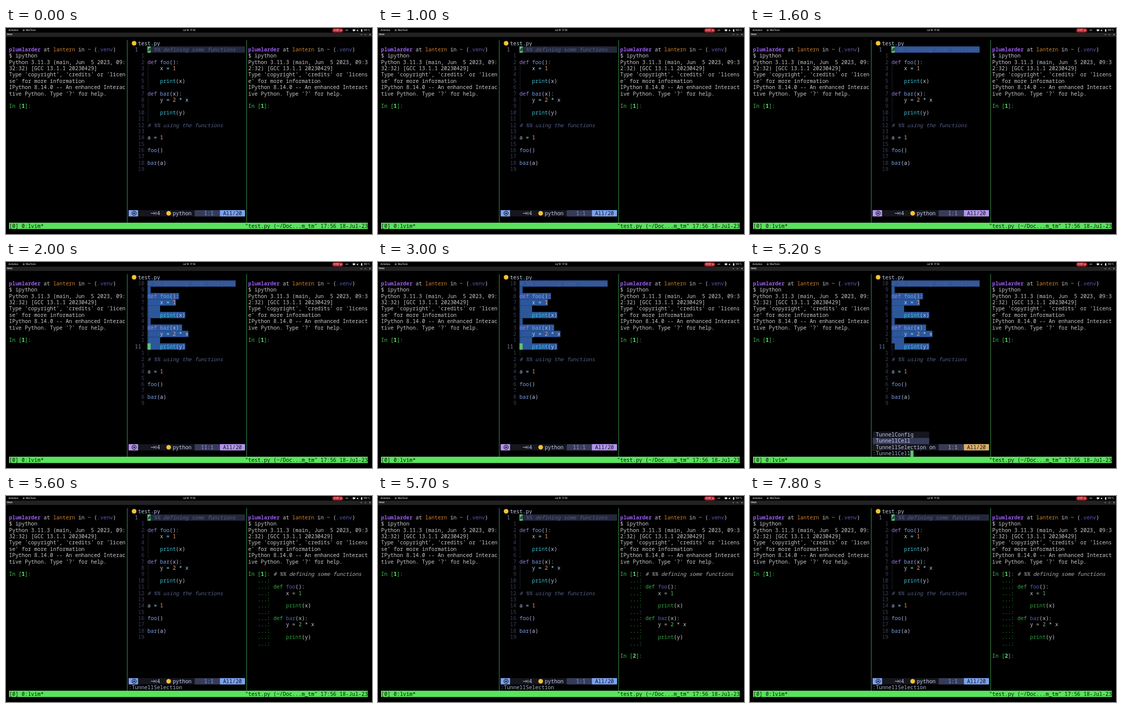
Animation of 720x405 px, one loop 8000 ms. Source, as an HTML page with a canvas:

```html
<!DOCTYPE html>
<html lang="en">
<head>
<meta charset="utf-8">
<title>Terminal session</title>
<style>
html, body { margin: 0; width: 100%; height: 100%; overflow: hidden; background: #000; }
canvas { display: block; width: 100vw; height: 100vh; }
</style>
</head>
<body>
<canvas id="stage" width="720" height="405"></canvas>
<script>
const ctx = document.getElementById('stage').getContext('2d');
const LOOP = 8000, CW = 6.19, RH = 12.38, LEFT = 6, TOP = 23.8;
const MID = 38, CODE = 44, RIGHT = 76;
const MONO = '"Noto Sans Mono", "DejaVu Sans Mono", monospace';
const UI = 'Inter, "Open Sans", sans-serif';

const FG = '#c9c9c9', PALE = '#c4cae8', GREEN = '#40cc50', CURSOR = '#5cc473';
const DARK = '#15161e', INK = '#14151d';
const MODES = { normal: '#7aa2f0', visual: '#b394ee', command: '#dcae68' };
const EDITOR = {
  comment: '#565f89', def: '#9d7ce0', print: '#3fc0d4', name: '#7aa2f0',
  num: '#ff9e64', op: '#89ddff', punct: '#b4bcdc', word: PALE
};
const SHELL = {
  comment: '#b0b0b4', def: '#2fb040', print: '#2fa840', name: '#5a5cb4',
  num: '#66c07a', op: '#b8b8b8', punct: FG, word: FG
};
const SOURCE = [
  '# %% defining some functions', '',
  'def foo():', '    x = 1', '', '    print(x)', '',
  'def bar(x):', '    y = 2 * x', '', '    print(y)', '',
  '# %% using the functions', '', 'a = 1', '', 'foo()', '', 'bar(a)', ''
];
const BANNER = [
  'Python 3.11.3 (main, Jun  5 2023, 09:32:32) [GCC 13.1.1 20230429]',
  "Type 'copyright', 'credits' or 'license' for more information",
  "IPython 8.14.0 -- An enhanced Interactive Python. Type '?' for help."
];
const MENU = ['TunnelConfig', 'TunnellCell', 'TunnellSelection'];
const TOKEN = /(?<comment>#.*)|(?<def>\bdef\b)|(?<print>\bprint\b)|(?<name>\b(?:foo|bar)\b)|(?<num>\d+)|(?<op>[=*])|(?<punct>[():])|(?<word>\w+)/g;

// Each step overrides part of the state from its time on.
const STEPS = [
  [0, { mode: 'normal', line: 1, cmd: null, pick: -1, typing: false, sent: 0 }],
  [1500, { mode: 'visual' }],
  [1700, { line: 11 }],
  [3300, { mode: 'command', typing: true, cmd: ":'<,'>" }],
  [3700, { cmd: ':' }],
  [4000, { cmd: ':T' }],
  [4200, { cmd: ':Tu' }],
  [4300, { cmd: ':Tun' }],
  [4500, { cmd: ':Tunn' }],
  [4600, { cmd: ':' + MENU[0], pick: 0 }],
  [5100, { cmd: ':' + MENU[1], pick: 1 }],
  [5300, { cmd: ':' + MENU[2], pick: 2 }],
  [5600, { mode: 'normal', line: 1, pick: -1, typing: false, sent: 1 }],
  [5700, { sent: 2 }]
];

const colX = c => LEFT + c * CW;
const rowY = r => TOP + r * RH;

function rect(x, y, w, h, color) {
  ctx.fillStyle = color;
  ctx.fillRect(x, y, w, h);
}

function cells(col, row, n, color) {
  rect(colX(col), rowY(row), n * CW, RH, color);
}

function dot(x, y, r, color) {
  ctx.fillStyle = color;
  ctx.beginPath();
  ctx.arc(x, y, r, 0, Math.PI * 2);
  ctx.fill();
}

function stroke(color, width, points) {
  ctx.strokeStyle = color;
  ctx.lineWidth = width;
  ctx.beginPath();
  points.forEach(([x, y], i) => i ? ctx.lineTo(x, y) : ctx.moveTo(x, y));
  ctx.stroke();
}

// Writes on the character grid and returns the next column.
function put(col, row, text, color, style = '500') {
  ctx.font = `${style} 10.32px ${MONO}`;
  ctx.fillStyle = color;
  const y = rowY(row) + RH / 2 + 3.6;
  for (const ch of text) {
    if (ch !== ' ') ctx.fillText(ch, colX(col), y);
    col++;
  }
  return col;
}

function spans(col, row, list) {
  for (const [text, color, style] of list) col = put(col, row, text, color, style);
}

function code(col, row, text, theme) {
  for (const m of text.matchAll(TOKEN)) {
    const kind = Object.keys(m.groups).find(k => m.groups[k] !== undefined);
    put(col + m.index, row, m[0], theme[kind], kind === 'comment' ? 'italic 500' : '500');
  }
}

function label(x, y, text, size, color = '#e4e4e4', weight = 500) {
  ctx.font = `${weight} ${size}px ${UI}`;
  ctx.fillStyle = color;
  ctx.fillText(text, x, y);
}

function desktop(seconds) {
  label(5, 6.2, 'Activities', 4.3);
  rect(33, 2.6, 3.6, 3.6, '#6c6c78');
  label(39, 6.2, 'WezTerm', 4.3);
  label(348, 6.2, 'Jul 18  17:56', 4.3);
  ctx.fillStyle = '#d4202c';
  ctx.beginPath();
  ctx.roundRect(642, 1, 21, 7.4, 3.7);
  ctx.fill();
  label(645, 6.2, '0:0' + seconds, 4.4);
  dot(658.8, 4.7, 1.1, '#f0d0d0');
  label(668, 6.2, 'en', 4.3);

  ctx.fillStyle = '#e4e4e4';
  ctx.beginPath();
  ctx.moveTo(684.5, 7);
  ctx.arc(684.5, 7, 4.4, -Math.PI * 0.76, -Math.PI * 0.24);
  ctx.fill();
  rect(690, 3.8, 1.2, 2, '#e4e4e4');
  ctx.beginPath();
  ctx.moveTo(690.6, 4.8);
  ctx.lineTo(692.6, 2.6);
  ctx.lineTo(692.6, 7);
  ctx.fill();
  rect(698.4, 2.6, 2.6, 4.6, '#e4e4e4');
  rect(699.1, 2, 1.2, 0.8, '#e4e4e4');
  label(703.5, 6.2, '100 %', 4.3);

  rect(0, 9, 720, 8.6, '#222222');
  label(2, 14.4, 'tmux', 4.3, '#dcdcdc', 700);
  const c = '#cccccc';
  stroke(c, 0.8, [[697.5, 12.4], [699, 13.8], [700.5, 12.4]]);
  stroke(c, 0.8, [[705.5, 13.8], [707, 12.4], [708.5, 13.8]]);
  stroke(c, 0.8, [[714.8, 11.8], [717.2, 14.2]]);
  stroke(c, 0.8, [[717.2, 11.8], [714.8, 14.2]]);
}

function prompt(col, row, n) {
  spans(col, row, [['In [', GREEN], [String(n), '#66f078', 'bold'], [']:', GREEN]]);
}

function shell(col, width) {
  spans(col, 1, [
    ['plumlarder', '#9a5cf0', 'bold'], [' at ', FG], ['lantern', '#d0822c'], [' in ', FG],
    ['~', GREEN, 'bold'], [' (', FG], ['.venv', '#5a5cb4'], [')', FG]
  ]);
  put(col, 2, '$ ipython', FG);
  let row = 3;
  for (const text of BANNER)
    for (let i = 0; i < text.length; i += width) put(col, row++, text.slice(i, i + width), FG);
  prompt(col, 10, 1);
}

function received(sent) {
  if (!sent) return;
  for (let i = 0; i < 12; i++) {
    if (i) put(RIGHT + 3, 10 + i, '...:', '#34a844');
    code(RIGHT + 8, 10 + i, SOURCE[i], SHELL);
  }
  if (sent > 1) prompt(RIGHT, 23, 2);
}

function editor(s) {
  dot(252, rowY(0) + 6.2, 4.6, '#f4c430');
  put(41, 0, 'test.py', PALE);
  const selecting = s.mode !== 'normal';
  if (!selecting) cells(CODE, 1, 31, '#24283b');

  SOURCE.forEach((text, i) => {
    const row = i + 1;
    const inBody = (row > 3 && row < 8) || (row > 8 && row < 13);
    const indent = (SOURCE[i + 1] || '').startsWith(' ') ? 4 : 1;
    if (selecting && row <= s.line) cells(CODE, row, text.length || indent, '#2c579c');
    if (row === s.line) cells(CODE, row, 1, s.typing ? '#000' : CURSOR);
    if (inBody && (row !== s.line || s.typing)) {
      ctx.setLineDash([2, 1]);
      stroke('#2c3048', 1, [[279.5, rowY(row)], [279.5, rowY(row + 1)]]);
      ctx.setLineDash([]);
    }
    if (row === s.line) put(40, row, String(row), '#8288b0');
    else put(41, row, String(Math.abs(row - s.line)).padStart(2), '#3b4261');
    code(CODE, row, text, EDITOR);
  });
  if (s.line === 1 && !s.typing) put(CODE, 1, '#', INK, 'italic 500');
}

function statusLine(s) {
  const color = MODES[s.mode], y = rowY(27) + RH / 2;
  cells(MID, 27, 37, DARK);
  cells(MID, 27, 3, color);
  ctx.strokeStyle = INK;
  ctx.lineWidth = 1.3;
  ctx.beginPath();
  ctx.arc(252, y, 4.1, 0, Math.PI * 2);
  ctx.stroke();
  dot(252, y, 1.7, INK);

  stroke(PALE, 1, [[285, y], [293, y]]);
  stroke(PALE, 1, [[290.5, y - 2.4], [293, y], [290.5, y + 2.4]]);
  stroke(PALE, 1, [[295, y - 3], [295, y + 3]]);
  put(47, 27, '4', PALE);
  dot(320, y, 4.6, '#f4c430');
  put(52, 27, 'python', PALE);
  cells(59, 27, 8, '#363b58');
  put(61, 27, (s.mode === 'visual' ? s.line + ':1' : '1:1').padStart(4), color);
  cells(67, 27, 8, color);
  put(68, 27, 'All/20', INK);
}

function commandLine(s) {
  if (s.pick >= 0) MENU.forEach((item, i) => {
    cells(MID, 25 + i, 18, i === s.pick ? '#363b58' : DARK);
    put(MID + 1, 25 + i, item, PALE);
  });
  if (s.cmd === null) return;
  const end = put(MID, 28, s.cmd, '#a9b1d6');
  if (s.typing) cells(end, 28, 1, CURSOR);
}

function tmux() {
  for (const col of [37, 75])
    rect(Math.floor(colX(col) + CW / 2), TOP, 1, RH * 29, '#3a9648');
  cells(0, 29, 114, '#58e45c');
  put(0, 29, '[0] 0:lvim*', '#0a140a');
  put(75, 29, '"test.py (~/Doc...m_tm" 17:56 18-Jul-23', '#0a140a');
}

function draw(t) {
  const s = Object.assign({}, ...STEPS.filter(([at]) => at <= t).map(([, change]) => change));
  rect(0, 0, 720, 405, '#000');
  desktop(Math.floor(t / 1000));
  shell(0, 37);
  shell(RIGHT, 38);
  received(s.sent);
  editor(s);
  statusLine(s);
  commandLine(s);
  tmux();
}

const start = performance.now();
function tick() {
  draw((performance.now() - start) % LOOP);
  requestAnimationFrame(tick);
}
tick();
</script>
</body>
</html>
```
